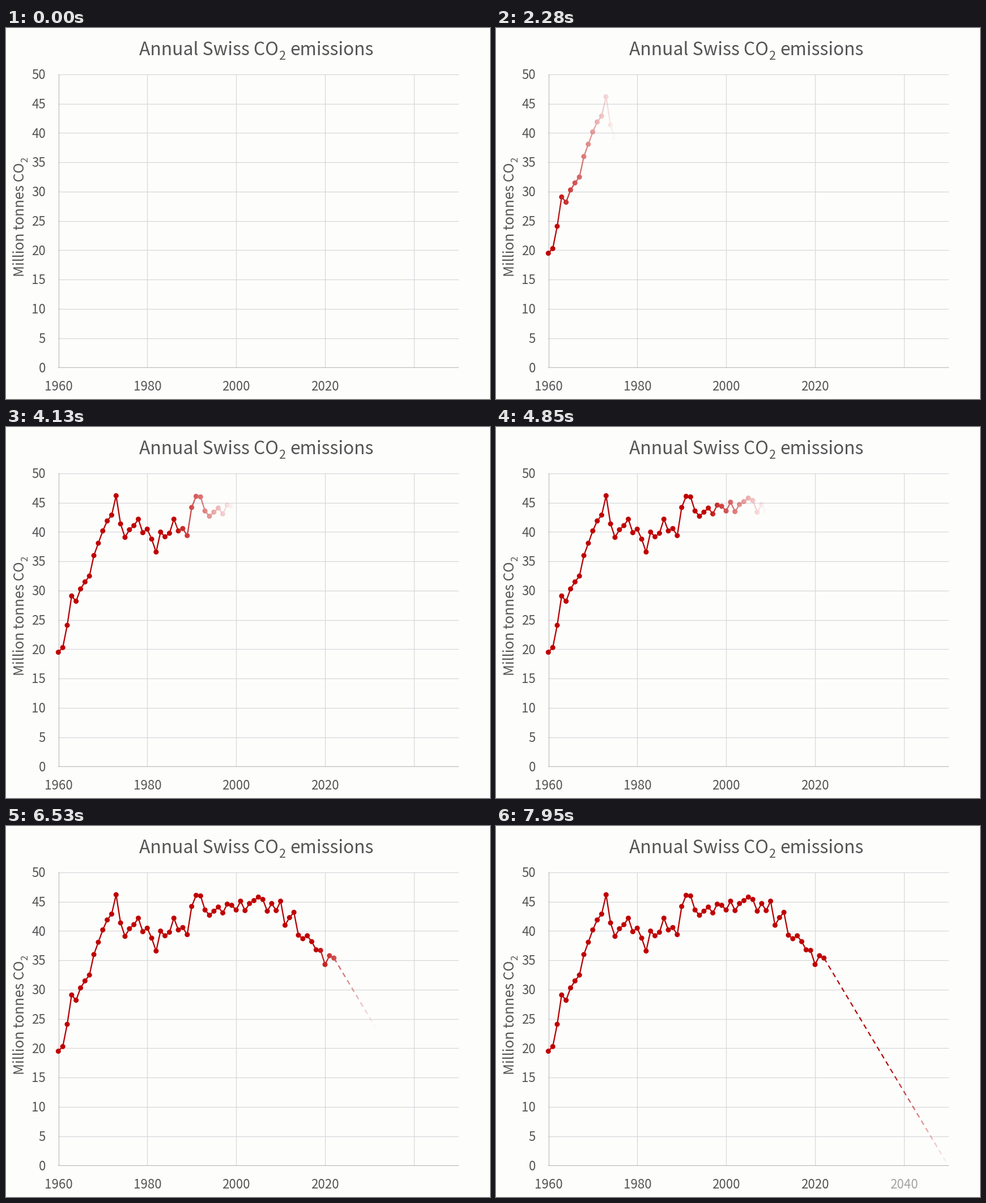
Recreate the animation shown at these times as a matplotlib script. Size 854 px wide and 655 px high, loop 7990 ms.

```python
import numpy as np
import matplotlib.pyplot as plt
from matplotlib.animation import FuncAnimation
from matplotlib.lines import Line2D

W, H, DPI = 854, 655, 100
LOOP, STEP = 7990, 34
PX = 72 / DPI                      # points per pixel

plt.rcParams["font.family"] = ["Noto Sans CJK JP", "DejaVu Sans"]
INK, GRID, AXIS = "#555555", "#d7d7db", "#bdbdbd"
LINE_RGB, DOT_RGB = (178, 4, 4), (191, 0, 0)

LEFT, RIGHT, TOP, BASE = 92, 798, 82, 599.5
YEAR = (RIGHT - LEFT) / 90         # pixels per year
UNIT = (BASE - TOP) / 50           # pixels per million tonnes

EMISSIONS = np.array([
    19.5, 20.3, 24.1, 29.1, 28.2, 30.3, 31.5, 32.5, 36.0, 38.1,
    40.2, 41.9, 42.9, 46.2, 41.4, 39.1, 40.4, 41.1, 42.2, 39.9,
    40.5, 38.8, 36.6, 40.0, 39.2, 39.8, 42.2, 40.2, 40.6, 39.4,
    44.2, 46.1, 46.0, 43.6, 42.7, 43.4, 44.1, 43.1, 44.6, 44.4,
    43.6, 45.1, 43.5, 44.7, 45.2, 45.8, 45.4, 43.4, 44.7, 43.5,
    45.1, 41.0, 42.3, 43.2, 39.3, 38.7, 39.2, 38.2, 36.8, 36.7,
    34.3, 35.8, 35.4])

# a hair over the exact size, so that rounding down keeps every pixel
fig = plt.figure(figsize=((W + 0.01) / DPI, (H + 0.01) / DPI), dpi=DPI,
                 facecolor="#fdfdfc")


def text(x, y, s, size, **kw):
    kw.setdefault("va", "baseline")
    return fig.text(x / W, 1 - y / H, s, fontsize=size * PX, color=INK, **kw)


def rule(x0, y0, x1, y1, color, z=1):
    fig.add_artist(Line2D([x0 / W, x1 / W], [1 - y0 / H, 1 - y1 / H],
                          color=color, lw=1.2 * PX, zorder=z))


def year_x(year):
    return LEFT + (year - 1960) * YEAR


def value_y(v):
    return BASE - v * UNIT


# chart frame and labels
for v in range(0, 51, 5):
    y = value_y(v)
    rule(LEFT, y, RIGHT, y, GRID if v else AXIS, 1 if v else 2)
    text(70, y + 8, str(v), 22.3, ha="right")
for year in range(1960, 2041, 20):
    x = year_x(year) + 0.5
    rule(x, TOP, x, BASE, GRID if year > 1960 else AXIS, 1 if year > 1960 else 2)
    label = text(x, 640, str(year), 22.3, ha="center")   # ends as the 2040 label

text(235, 47.5, "Annual Swiss CO", 31.9)
text(481, 56, "2", 21.5)
text(501.5, 47.5, "emissions", 31.7)
turned = dict(rotation=90, rotation_mode="anchor", ha="left")
text(32, 439, "Million tonnes CO", 24.6, **turned)
text(38, 237, "2", 16.5, **turned)

# coverage of the whole curve, worked out once per pixel
X0, X1, Y0, Y1 = 84, 806, 112, 606
gx, gy = np.meshgrid(np.arange(X0, X1) + 0.5, np.arange(Y0, Y1) + 0.5)


def stroke(ax, ay, bx, by, width, dash=None):
    length = np.hypot(bx - ax, by - ay)
    ux, uy = (bx - ax) / length, (by - ay) / length
    along = (gx - ax) * ux + (gy - ay) * uy
    near = np.clip(along, 0, length)
    dist = np.hypot(gx - ax - near * ux, gy - ay - near * uy)
    cover = np.clip(width / 2 + 0.5 - dist, 0, 1)
    if dash:
        on, off = dash
        s = np.mod(along, on + off)
        cover = cover * np.clip(np.minimum(s + 0.5, on - s + 0.5), 0, 1)
    return cover


px = year_x(1960 + np.arange(len(EMISSIONS))) + 0.3
py = value_y(EMISSIONS)
lines = np.zeros_like(gx)
dots = np.zeros_like(gx)
for i in range(len(px) - 1):
    lines = np.maximum(lines, stroke(px[i], py[i], px[i + 1], py[i + 1], 2.3))
lines = np.maximum(lines, stroke(px[-1], py[-1], RIGHT, BASE, 2.2, (8.7, 6.5)))
for x, y in zip(px, py):
    dots = np.maximum(dots, np.clip(4.5 + 0.5 - np.hypot(gx - x, gy - y), 0, 1))

cover = np.maximum(lines, dots)
curve = np.zeros(gx.shape + (4,), np.uint8)
curve[..., :3] = np.where(dots[..., None] > 0, DOT_RGB, LINE_RGB)
layer = fig.figimage(curve, xo=X0, yo=H - Y1, origin="upper", zorder=5)

FEATHER = 108


def draw(i):
    t = i * STEP
    edge = 211 + 0.1044 * (t - 2280)           # soft wipe, left to right
    fade = np.clip((edge - gx[0]) / FEATHER, 0, 1)
    rgba = curve.copy()
    rgba[..., 3] = np.round(255 * cover * fade)
    layer.set_data(rgba)
    label.set_alpha(float(np.clip((t - 7660) / 500, 0, 1)))
    return layer, label


anim = FuncAnimation(fig, draw, frames=LOOP // STEP, interval=STEP,
                     init_func=lambda: draw(0), repeat=True, repeat_delay=0,
                     blit=False)
plt.show()
```
